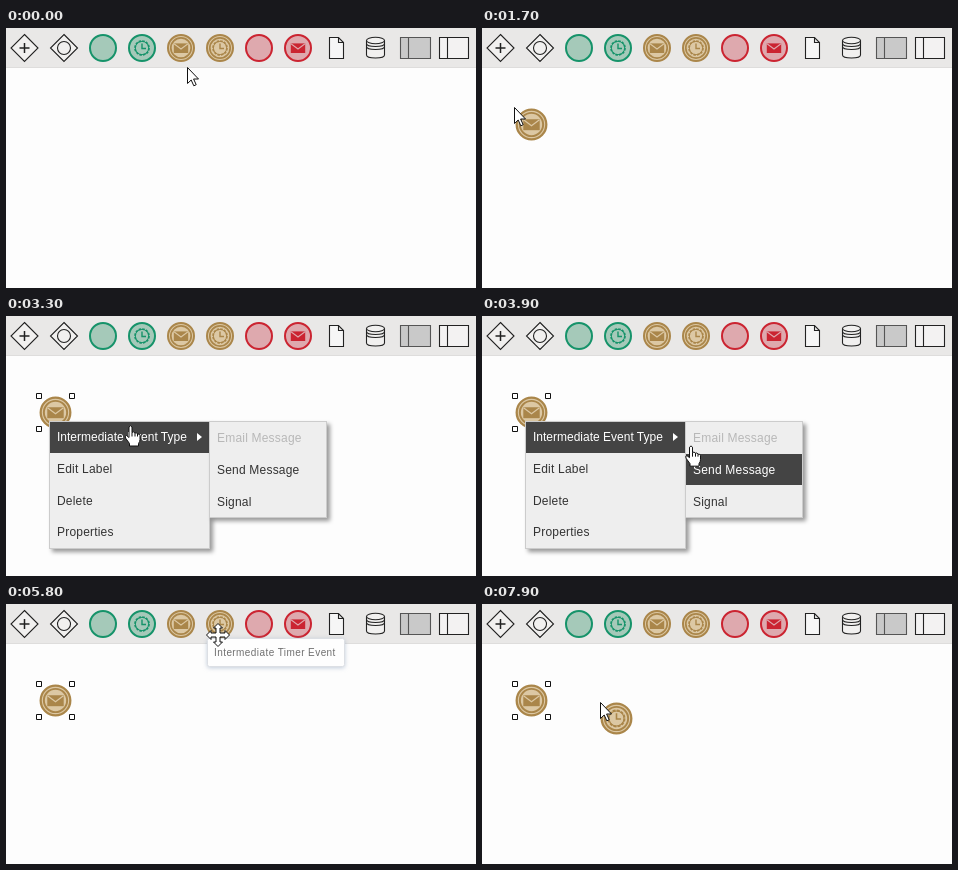
Write an HTML page that moves like this. It is 470 px wide and 260 px high and loops after 8 s.

```html
<!DOCTYPE html>
<html lang="en">
<head>
<meta charset="utf-8">
<title>Process modeler</title>
<style>
  html, body { margin: 0; width: 100%; height: 100%; overflow: hidden; background: #fdfdfd; }
  svg { display: block; font: 12px Arial, "Liberation Sans", sans-serif; }
  .green { --line: #16936a; --fill: #a5c9b9; }
  .brown { --line: #aa864a; --fill: #dcc8a4; }
  .red { --line: #cb2431; --fill: #dea9ae; }
  .disc { fill: var(--fill); stroke: var(--line); stroke-width: 2; }
  .thin { fill: none; stroke: var(--line); stroke-width: 1.7; }
  .solid { fill: var(--line); }
  .flap { fill: none; stroke: var(--fill); stroke-width: 1.1; }
  .ink { fill: none; stroke: #222; stroke-width: 1.1; }
  .panel { fill: #eee; stroke: #ccc; filter: drop-shadow(3px 3px 2px #0006); }
  .item { fill: #333; letter-spacing: .2px; }
  .tip rect { fill: #fefefe; stroke: #dcdfe4; filter: drop-shadow(0 1px 2px #8fa3bd88); }
  .tip text { font-size: 10px; letter-spacing: .42px; fill: #707070; }
  .pointer { fill: #fff; stroke: #111; stroke-width: 1; stroke-linejoin: round; }
</style>
</head>
<body>
<svg width="470" height="260" viewBox="0 0 470 260">
  <defs>
    <circle id="disc" class="disc" r="13"/>
    <g id="double"><circle class="disc" r="13"/><circle class="thin" r="10.2"/></g>
    <g id="envelope">
      <rect class="solid" x="-7.2" y="-4.6" width="14.4" height="9.6"/>
      <path class="flap" d="M-7-4.2 0 1 7-4.2"/>
    </g>
    <g id="clock">
      <circle class="thin" r="7" stroke-dasharray="2.6 1.065"/>
      <circle class="thin" r="6.6" style="stroke-width:.9"/>
      <path class="thin" d="M0-4.5V.5H4" style="stroke-width:1.4"/>
    </g>
    <g id="mail" class="brown"><use href="#double"/><use href="#envelope"/></g>
    <g id="timer" class="brown"><use href="#double"/><use href="#clock"/></g>
  </defs>

  <rect width="470" height="260" fill="#fdfdfd"/>
  <rect width="470" height="40" fill="#e9e8e7"/>
  <path d="M0 39.5H470" stroke="#dedddc"/>

  <g class="ink">
    <path d="M18.5 6.5 32 20 18.5 33.5 5 20ZM58 6.5 71.5 20 58 33.5 44.5 20Z" fill="#f1f0ef"/>
    <path d="M13.5 20H23.5M18.5 15V25" stroke-width="1.5"/>
    <circle cx="58" cy="20" r="6.5"/>
    <path d="M323.5 9.5H332.5L337.5 14.5V30.5H323.5ZM332.5 9.5V14.5H337.5" fill="#f6f6f6"/>
    <path d="M360.5 12.5V27C360.5 31 378.5 31 378.5 27V12.5" fill="#f1f0ef"/>
    <ellipse cx="369.5" cy="12.5" rx="9" ry="3.2" fill="#f1f0ef"/>
    <path d="M360.5 15.5C360.5 19.5 378.5 19.5 378.5 15.5M360.5 18.5C360.5 22.5 378.5 22.5 378.5 18.5"/>
    <path d="M394.5 9.5H424.5V30.5H394.5ZM402.5 9.5V30.5" fill="#c9c9c9" stroke="#555"/>
    <path d="M433.5 9.5H462.5V30.5H433.5ZM441.5 9.5V30.5" fill="#f3f2f2"/>
  </g>
  <g class="green" transform="translate(97 20)"><use href="#disc"/></g>
  <g class="green" transform="translate(136 20)"><use href="#disc"/><use href="#clock"/></g>
  <use href="#mail" x="175" y="20"/>
  <use href="#timer" x="214" y="20"/>
  <g class="red" transform="translate(253 20)"><use href="#disc"/></g>
  <g class="red" transform="translate(292 20)"><use href="#disc"/><use href="#envelope"/></g>

  <use id="mailNode" href="#mail" transform="translate(49.5 96.5) scale(1.14)"/>
  <use id="timerNode" href="#timer" transform="translate(134.5 114.5) scale(1.14)"/>
  <path id="handles" fill="#fff" stroke="#111"
    d="M30.5 77.5h5v5h-5zM63.5 77.5h5v5h-5zM30.5 110.5h5v5h-5zM63.5 110.5h5v5h-5z"/>

  <g id="menu">
    <rect class="panel" x="43.5" y="105.5" width="160" height="127"/>
    <rect id="typeRow" x="44" y="106" width="159" height="31" fill="#444"/>
    <text id="typeText" x="51" y="125">Intermediate Event Type</text>
    <path id="typeArrow" d="M191 117V125L196 121Z"/>
    <g class="item">
      <text x="51" y="157">Edit Label</text>
      <text x="51" y="189">Delete</text>
      <text x="51" y="220">Properties</text>
    </g>
  </g>
  <g id="submenu" class="item">
    <rect class="panel" x="203.5" y="105.5" width="117" height="96"/>
    <rect id="sendRow" x="204" y="138" width="116" height="31" fill="#444"/>
    <text x="211" y="126" fill="#b8b8b8">Email Message</text>
    <text id="sendText" x="211" y="158">Send Message</text>
    <text x="211" y="190">Signal</text>
  </g>

  <g id="mailTip" class="tip">
    <rect x="162.5" y="34.5" width="137" height="28" rx="2"/>
    <text x="169" y="52">Intermediate Email Event</text>
  </g>
  <g id="timerTip" class="tip">
    <rect x="201.5" y="34.5" width="137" height="28" rx="2"/>
    <text x="208" y="52">Intermediate Timer Event</text>
  </g>

  <use id="mailGhost" href="#mail" opacity=".6"/>
  <use id="timerGhost" href="#timer" opacity=".6"/>
  <g id="cursor" class="pointer">
    <path id="arrow" d="M.5.5V16.5L4.2 13 6.8 18.8 9.2 17.7 6.6 12H11.5Z"/>
    <path id="move" d="M0-11.5 4.5-7H2V-2H7V-4.5L11.5 0 7 4.5V2H2V7H4.5L0 11.5-4.5 7H-2V2H-7V4.5L-11.5 0-7-4.5V-2H-2V-7H-4.5Z"/>
    <path id="hand" d="M-1.5 1.5Q0-1 1.5 1.5V7Q3 5.5 4.5 7.5 6 6.5 7 8.5 9 8 9.5 10V14Q9.5 16 8 18V20.5H-1V18L-5 12.5Q-6 10-4 10L-1.5 12ZM1.5 7V11M4.5 7.5V11M7 8.5V11"/>
  </g>
</svg>
<script>
const LOOP = 8000, STEP = 100;
const $ = id => document.getElementById(id);

// time, x, y of the pointer
const path = [
  [0, 181, 39], [100, 181, 38], [300, 176, 27], [500, 174, 27], [900, 105.5, 61],
  [1500, 30, 84], [1699, 30, 84], [1700, 32, 79], [2000, 46, 95], [2200, 46, 95],
  [2400, 43, 104], [2600, 43, 104], [3200, 124, 109], [3400, 125, 110],
  [3800, 205, 121], [4100, 217, 147], [4400, 217, 147], [4700, 216, 114],
  [5300, 211, 38], [5600, 212, 31], [6600, 212, 31], [7500, 118, 98], [LOOP, 118, 98]
];

function pointerAt(t) {
  const i = path.findIndex(key => key[0] > t);
  const [t0, x0, y0] = path[i - 1], [t1, x1, y1] = path[i];
  const k = (t - t0) / (t1 - t0);
  return [x0 + (x1 - x0) * k, y0 + (y1 - y0) * k];
}

const ramp = (t, from, to) => Math.min(1, Math.max(0, (t - from) / (to - from)));
const show = (id, on) => $(id).style.display = on ? "" : "none";
const fade = (id, alpha) => $(id).style.opacity = alpha;
const paint = (id, color) => $(id).style.fill = color;

function draw(now) {
  const t = Math.floor(now % LOOP / STEP) * STEP;
  const during = (from, to = LOOP) => t >= from && t < to;
  const [x, y] = pointerAt(t);

  const moving = during(200, 1700) || during(5500, 7900);
  const pointing = during(2700, 4300);
  show("move", moving);
  show("hand", pointing);
  show("arrow", !moving && !pointing);
  $("cursor").setAttribute("transform", `translate(${x} ${y})`);

  for (const id of ["mailGhost", "timerGhost"])
    $(id).setAttribute("transform", `translate(${x + 2.5} ${y - 11})`);
  show("mailGhost", during(600, 1700));
  show("timerGhost", during(6800, 7900));
  show("mailNode", during(1700));
  show("timerNode", during(7900));
  show("handles", during(2600));

  fade("mailTip", ramp(t, 200, 500) * (1 - ramp(t, 700, 1300)));
  fade("timerTip", ramp(t, 5400, 5800) * (1 - ramp(t, 6900, 7400)));

  const typeHover = during(2700), sendHover = during(3900);
  show("menu", during(2600, 4300));
  show("submenu", during(2900, 4300));
  show("typeRow", typeHover);
  paint("typeText", typeHover ? "#fff" : "#333");
  paint("typeArrow", typeHover ? "#fff" : "#333");
  show("sendRow", sendHover);
  paint("sendText", sendHover ? "#fff" : "#333");
}

const start = performance.now();
function tick() {
  draw(performance.now() - start);
  requestAnimationFrame(tick);
}
tick();
</script>
</body>
</html>
```
